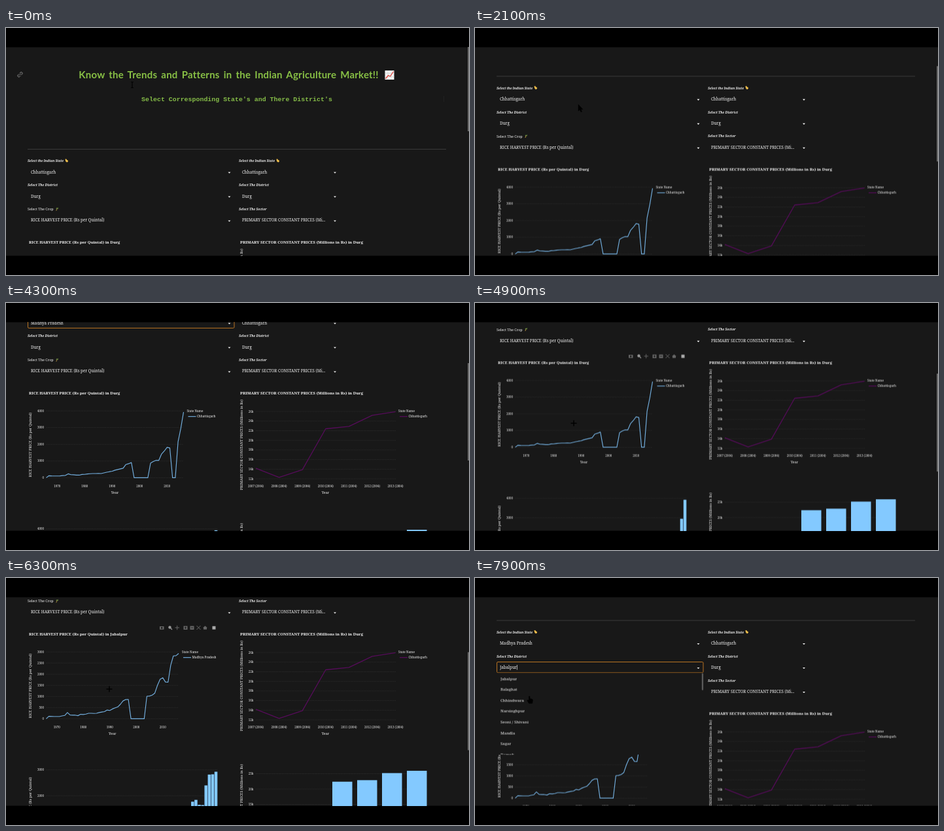
Recreate the animation shown at these times as an HTML page. Size 708x378 px, loop 8000 ms.

```html
<!DOCTYPE html>
<html lang="en">
<head>
<meta charset="utf-8">
<title>Agriculture dashboard</title>
<style>
html, body { margin: 0; width: 100%; height: 100%; overflow: hidden; background: #000; }
svg { display: block; width: 708px; height: 378px; }
text { font-family: "Noto Serif", serif; font-weight: 500; fill: #f4f4f4; white-space: pre; }
.b { font-weight: 700; }
.bi { font-weight: 700; font-style: italic; }
.mid { text-anchor: middle; }
.end { text-anchor: end; }
#title { font-family: Lato, sans-serif; font-weight: 700; letter-spacing: .2px; word-spacing: 2.3px; }
#sub { font-family: "Liberation Mono", monospace; font-weight: 700; fill: #86bd48; }
.grid { stroke: #313131; stroke-width: .7; stroke-dasharray: 1.5 1; }
.line { fill: none; stroke: #74b0e0; stroke-width: 1.15; stroke-linejoin: round; }
.purple { stroke: #560c5a; stroke-width: 1.3; }
.focus { fill: none; stroke: #b87322; stroke-width: 1; }
#page, #cursor, #thumb, .stale, #title { animation: 8s linear -20ms infinite; }
#page { animation-name: scroll; }
#cursor { animation-name: move; }
#thumb { animation-name: thumb; }
.stale { animation-name: stale; }
#title { animation-name: fade; }

@keyframes scroll {
  0% { transform: translateY(0); }
  16.25% { transform: translateY(0); animation-timing-function: steps(4); }
  21.25% { transform: translateY(-76px); animation-timing-function: steps(5); }
  27.5% { transform: translateY(-120.5px); }
  52.5% { transform: translateY(-120.5px); animation-timing-function: step-end; }
  53.75% { transform: translateY(-190px); animation-timing-function: steps(2); }
  56.25% { transform: translateY(-226px); animation-timing-function: steps(6); }
  63.75% { transform: translateY(-242px); }
  78.75% { transform: translateY(-242px); animation-timing-function: step-end; }
  80% { transform: translateY(-215px); animation-timing-function: steps(2); }
  82.5% { transform: translateY(-160px); animation-timing-function: steps(4); }
  87.5%, 100% { transform: translateY(-120.5px); }
}
@keyframes thumb {
  0%, 16.25% { transform: translateY(29px); height: 129px; animation-timing-function: steps(9); }
  27.5% { transform: translateY(62px); height: 148px; }
  52.5% { transform: translateY(62px); height: 148px; animation-timing-function: step-end; }
  53.75% { transform: translateY(92px); height: 149px; animation-timing-function: steps(8); }
  63.75% { transform: translateY(113.5px); height: 150px; }
  78.75% { transform: translateY(113.5px); height: 150px; animation-timing-function: steps(7); }
  87.5%, 100% { transform: translateY(62px); height: 148px; }
}
@keyframes move {
  0% { transform: translate(193px, 87px); animation-timing-function: steps(5); }
  6.25% { transform: translate(225px, 111px); }
  12.5% { transform: translate(225px, 111px); animation-timing-function: steps(2); }
  15% { transform: translate(158px, 117px); }
  30% { transform: translate(158px, 117px); animation-timing-function: steps(3); }
  33.75% { transform: translate(84px, 100px); }
  36.25% { transform: translate(84px, 100px); animation-timing-function: steps(4); }
  41.25% { transform: translate(83px, 134px); }
  52.5% { transform: translate(83px, 134px); animation-timing-function: step-end; }
  57.5% { transform: translate(151px, 184px); }
  72.5% { transform: translate(151px, 184px); animation-timing-function: steps(2); }
  75% { transform: translate(158px, 170px); }
  78.75% { transform: translate(158px, 170px); animation-timing-function: steps(7); }
  87.5% { transform: translate(85px, 150px); }
  90% { transform: translate(85px, 150px); animation-timing-function: steps(2); }
  92.5% { transform: translate(84px, 136px); }
  93.75% { transform: translate(84px, 136px); animation-timing-function: steps(4); }
  98.75%, 100% { transform: translate(84px, 187px); }
}
@keyframes stale {
  0%, 63.75% { opacity: 1; animation-timing-function: steps(2); }
  66.25% { opacity: .53; }
  68.75% { opacity: .53; animation-timing-function: step-end; }
  70%, 100% { opacity: 1; }
}
@keyframes fade {
  0% { fill: #88c045; animation-timing-function: steps(5); }
  6.25%, 100% { fill: #333; }
}
</style>
</head>
<body>
<svg id="stage" viewBox="0 0 708 378"></svg>
<script>
const LOOP = 8000;
const rules = [];

const tag = (name, attrs, body = '') =>
  `<${name} ${Object.entries(attrs).map(([k, v]) => `${k}="${v}"`).join(' ')}>${body}</${name}>`;
const rect = (x, y, width, height, fill, extra = {}) => tag('rect', { x, y, width, height, fill, ...extra });
const path = (d, attrs) => tag('path', { d, ...attrs });
const group = (body, attrs = {}) => tag('g', attrs, body);

// y is the vertical middle of the capitals
const text = (x, y, size, body, cls = '', extra = {}) =>
  tag('text', { x, y: y + size * .35, 'font-size': size, class: cls, ...extra }, body);
const upright = (x, y, size, body) =>
  text(x, y, size, body, 'mid', { transform: `rotate(-90 ${x} ${y})` });

// Shows a group only in the given [from, to] windows (ms)
function during(body, ...windows) {
  const name = 'w' + rules.length;
  const steps = windows.map(([from, to]) =>
    `${from / LOOP * 100}%{visibility:visible}${to / LOOP * 100}%{visibility:hidden}`).join('');
  rules.push(`@keyframes ${name}{0%{visibility:hidden}${steps}}`);
  return group(body, { style: `animation:${name} 8s step-end -20ms infinite` });
}

const caret = (x, y) => path(`M${x - 2} ${y - .6}h4l-2 2.2z`, { fill: '#fff' });
const hline = (x1, x2, y) => path(`M${x1} ${y}H${x2}`, { class: 'grid' });
const polyline = (points, cls) => path('M' + points.map(p => p.join(' ')).join('L'), { class: cls });
const range = (from, to, step) =>
  Array.from({ length: Math.round((to - from) / step) + 1 }, (_, i) => from + i * step);

const pointer = (x, y) =>
  path(`M${x - 2} ${y - 2.2}l1.5-.6 1 1.6 1.6.6.4 1.8-1.4 1.4-1.6-.6-1-1.6z`, { fill: '#f0bd4a' });
const sprout = (x, y) =>
  path(`M${x - 1.2} ${y + 2.6}q1-2 1.5-4`, { stroke: '#c9a646', 'stroke-width': .9, fill: 'none' }) +
  path(`M${x - 1.5} ${y - .2}l.8-2 1 1.6zM${x} ${y - .8}l1.7-1.7v2.6z`, { fill: '#6f9a48' });

function header() {
  const link = path('M20 72.6l3-3m-2.2-.3l1.2-1.2a1.8 1.8 0 0 1 2.6 2.6l-1.2 1.2m-1.2 1.3l-1.2 1.2a1.8 1.8 0 0 1-2.6-2.6l1.2-1.2',
    { fill: 'none', stroke: '#999', 'stroke-width': .9 });
  const chartIcon = rect(579.5, 65, 14, 14, '#f3f3f3') +
    path('M584 65v14M589 65v14M579.5 69.5h14M579.5 74.5h14', { stroke: '#c9d3d6', 'stroke-width': .6 }) +
    path('M580.5 77.5l4-5 3 1.5 5-7.5', { fill: 'none', stroke: '#dd4038', 'stroke-width': 1.3 });
  return during(link, [0, 300]) +
    text(340.5, 72, 15, 'Know the Trends and Patterns in the Indian Agriculture Market!!', 'mid', { id: 'title' }) +
    chartIcon +
    text(353, 108.5, 9.93, "Select Corresponding State's and There District's", 'mid', { id: 'sub' }) +
    path('M669.5 104v9', { stroke: '#222' }) +
    path('M33 185.5H673', { stroke: '#444', 'stroke-width': .8 });
}

const value = (x, y, body) => text(x, y, 6.25, body);

function controls() {
  const sides = [[33, 341.5], [356, 503]].map(([x, end]) =>
    text(x, 203.5, 4.85, 'Select the Indian State', 'bi') + pointer(x + 59.5, 203) +
    text(x, 240.5, 5, 'Select The District', 'bi') +
    caret(end, 221) + caret(end, 258)).join('');
  return sides +
    during(value(38, 220.5, 'Chhattisgarh'), [0, 3800]) +
    during(value(38, 220.5, 'Madhya Pradesh'), [3800, LOOP]) +
    during(value(38, 257.5, 'Durg'), [0, 5600]) +
    during(value(38, 257.5, 'Jabalpur'), [5600, LOOP]) +
    value(361, 220.5, 'Chhattisgarh') + value(361, 257.5, 'Durg') +
    text(33, 277.3, 5.4, 'Select The Crop') + sprout(78, 277) +
    group(value(38, 294.3, 'RICE HARVEST PRICE (Rs per Quintal)') + caret(341.5, 295), { class: 'stale' }) +
    text(356, 277.3, 5, 'Select The Sector', 'bi') +
    value(361, 294.3, 'PRIMARY SECTOR CONSTANT PRICES (Mi...') + caret(503, 295);
}

function legend(x, y, name, cls) {
  return text(x, y, 4.6, 'State Name') + path(`M${x + 2} ${y + 8}h12`, { class: cls }) +
    text(x + 15.5, y + 8, 4.65, name);
}

function cropChart({ district, state, prices, max, tick, yearWidth }) {
  const zero = 457.4, x0 = 61.5, right = x0 + 50 * yearWidth;
  const y = v => zero - v / max * 102.3;
  const barZero = 654.3, barY = v => barZero - v / max * 118.6;
  const name = 'RICE HARVEST PRICE (Rs per Quintal)';
  return text(35, 328.3, 6, `${name} in ${district}`, 'b') +
    range(0, max, tick).map(v => hline(x0, right, y(v)) + text(58, y(v), 4.5, v, 'end')).join('') +
    range(1970, 2010, 10).map(year => text(x0 + (year - 1966) * yearWidth, 470.5, 4.5, year, 'mid')).join('') +
    text((x0 + right) / 2, 480.5, 5.4, 'Year', 'mid') + upright(37, 407, 5.5, name) +
    polyline(prices.map((v, i) => [x0 + i * yearWidth, y(v)]), 'line') +
    legend(right + 5, 355.7, state, 'line') +
    range(0, max, 1000).map(v => hline(x0, 324, barY(v)) + text(58, barY(v), 4.5, v, 'end')).join('') +
    prices.map((v, i) => rect(318.8 - 5.1 * (50 - i), barY(v), 4.5, barZero - barY(v), '#83c9ff')).join('') +
    upright(37, 596, 5.5, name);
}

function sectorChart() {
  const output = [14.2, 12.3, 13.9, 22.4, 22.9, 25.2, 25.95];
  const x = i => 382 + 35.6 * i, y = k => 356 + (26 - k) * 7.36, barY = k => 541.5 + (25 - k) * 4.7;
  const name = 'PRIMARY SECTOR CONSTANT PRICES (Millions in Rs)';
  return text(358, 328.3, 6.1, `${name} in Durg`, 'b') +
    range(12, 26, 2).map(k => hline(382, 596, y(k)) + text(378.5, y(k), 4.5, k + 'k', 'end')).join('') +
    output.map((_, i) => text(x(i), 470.5, 4.45, `${2007 + i} (2004)`, 'mid')).join('') +
    text(488.5, 480.5, 5.4, 'Year', 'mid') + upright(360, 407, 5.5, name) +
    polyline(output.map((k, i) => [x(i), y(k)]), 'line purple') +
    legend(600, 355.7, 'Chhattisgarh', 'line purple') +
    range(10, 25, 5).map(k => hline(382, 645, barY(k)) + text(378.5, barY(k), 4.5, k + 'k', 'end')).join('') +
    output.map((k, i) => rect(385 + 38 * i, barY(k), 30.5, barY(0) - barY(k), '#83c9ff')).join('') +
    upright(360, 596, 5.5, name);
}

function toolbar() {
  const y = 318, fill = '#666';
  const box = x => rect(x - 3, y - 2.5, 6, 5.5, fill);
  const sign = d => path(d, { stroke: '#181818', 'stroke-width': .9 });
  const stroke = { fill: 'none', stroke: fill, 'stroke-width': 1 };
  return rect(235, y - 2, 6.5, 4.8, fill) + tag('circle', { cx: 238.2, cy: y + .4, r: 1.3, fill: '#181818' }) +
    tag('circle', { cx: 250.5, cy: y - .5, r: 2.2, fill: '#999' }) +
    path(`M252 ${y + 1}l2 2`, { stroke: '#999', 'stroke-width': 1.2 }) +
    path(`M258.5 ${y}h6.5M261.7 ${y - 3.2}v6.5`, stroke) +
    box(274.5) + sign(`M272.8 ${y + .2}h3.4M274.5 ${y - 1.5}v3.4`) +
    box(284.5) + sign(`M282.8 ${y + .2}h3.4`) +
    path(`M291.5 ${y - 3}l6 6m0-6l-6 6`, stroke) +
    path(`M301 ${y + .2}l3.5-3 3.5 3h-1v2.6h-5v-2.6z`, { fill }) +
    rect(315.5, y - 2.3, 5, 5, '#aaa');
}

const focusRing = y => rect(33.5, y, 315.5, 16.4, 'none', { class: 'focus', rx: 1.5 });

function menu(top, height, thumb, items) {
  const id = 'menu' + Math.round(top);
  return tag('clipPath', { id }, rect(33, top, 317, height)) +
    group(rect(33, top, 317, height, '#181818') +
      items.map((item, i) => text(39, top + 8.7 + 16.6 * i, 6.1, item)).join('') +
      rect(346.8, top + .5, 2.3, thumb, '#5a5a5a', { rx: 1 }), { 'clip-path': `url(#${id})` });
}

function cursors() {
  const black = { fill: '#000', stroke: '#000', 'stroke-width': .5, 'stroke-linejoin': 'round' };
  const hand = path('M-1.6-6q1.2-.8 1.6.5v3l3.6.9q1 .5.8 2l-.9 4.6h-5l-2.6-4.2q0-1.4 1.4-1l1.1.7z', black);
  return during(path('M-1.8-4.5q1.8 0 1.8 1v7q0 1-1.8 1M1.8-4.5q-1.8 0-1.8 1M1.8 4.5q-1.8 0-1.8-1',
      { fill: 'none', stroke: '#000', 'stroke-width': 1.1 }), [0, 300]) +
    during(path('M0 0v10l2.3-2 1.6 3.6 1.6-.7-1.6-3.5h3z', black), [300, 2700], [6400, 7000]) +
    during(hand, [2700, 4300], [7000, LOOP]) +
    during(path('M-4.5 0h9M0-4.5v9', { stroke: '#000', 'stroke-width': 1.5 }), [4600, 6400]);
}

const idle = Array(6).fill(0);
const durg = {
  district: 'Durg', state: 'Chhattisgarh', max: 4000, tick: 1000, yearWidth: 4.2,
  prices: [0, 120, 110, 105, 105, 110, 130, 140, 235, 180, 175, 160, 155, 195, 200, 225, 240, 250, 250, 255, 250,
    290, 330, 360, 385, 450, 490, 530, 570, 790, 840, 910, ...idle,
    880, 970, 1040, 1040, 1420, 1600, 1820, 1780, 0, 0, 2150, 2950, 3930]
};
const jabalpur = {
  district: 'Jabalpur', state: 'Madhya Pradesh', max: 3000, tick: 500, yearWidth: 4.05,
  prices: [0, 110, 105, 100, 100, 100, 130, 150, 280, 170, 160, 160, 140, 200, 190, 210, 245, 245, 240, 245, 280,
    300, 320, 390, 370, 440, 490, 530, 650, 800, 860, 870, ...idle,
    1010, 1020, 1060, 1150, 1500, 1770, 1840, 1650, 1640, 2400, 2820, 2830, 2930]
};
const states = ['Chhattisgarh', 'Madhya Pradesh', 'Andhra Pradesh', 'Telangana', 'Karnataka',
  'Tamil Nadu', 'Maharashtra', 'Gujarat'];
const districts = ['Jabalpur', 'Balaghat', 'Chhindwara', 'Narsinghpur', 'Seoni / Shivani',
  'Mandla', 'Sagar', 'Damoh'];

const page = header() + controls() +
  group(during(cropChart(durg), [0, 5900]) + during(cropChart(jabalpur), [5900, LOOP]) + sectorChart(),
    { class: 'stale' }) +
  during(toolbar(), [4600, 6400]) +
  during(focusRing(212), [2700, 5200]) +
  during(menu(229, 125.8, 46, states), [2700, 3800]) +
  during(focusRing(249) + path('M64.3 253.5v7.5', { stroke: '#fff', 'stroke-width': .7 }) +
    menu(265.8, 125.2, 26, districts), [7400, LOOP]);

document.getElementById('stage').innerHTML =
  rect(0, 0, 708, 378, '#000') +
  tag('clipPath', { id: 'view' }, rect(0, 29.5, 708, 319)) +
  group(rect(0, 29, 708, 320, '#181818') + group(page, { id: 'page' }) +
    during(rect(706, 0, 2, 129, '#686868', { id: 'thumb' }), [0, 2700], [3800, 7400]) +
    group(cursors(), { id: 'cursor' }), { 'clip-path': 'url(#view)' });

const sheet = document.createElement('style');
sheet.textContent = rules.join('\n');
document.head.append(sheet);
</script>
</body>
</html>
```
